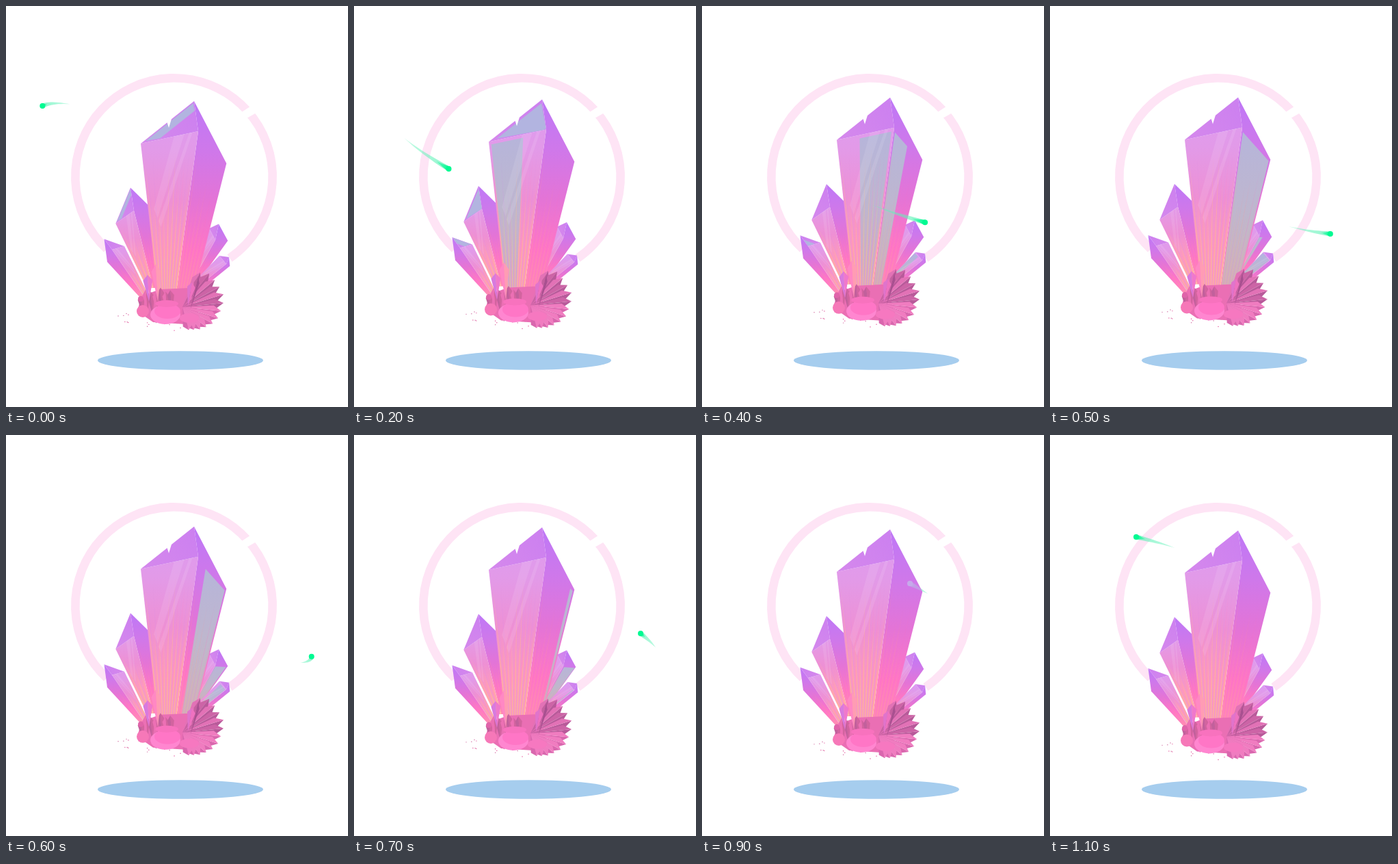
An HTML page with a canvas for the animation above (1.2 s loop, 500 px wide and 586 px high).

```html
<!DOCTYPE html>
<html>
<head>
<meta charset="utf-8">
<style>
html, body { margin: 0; width: 100%; height: 100%; overflow: hidden; background: #fff; }
canvas { display: block; }
</style>
</head>
<body>
<canvas id="stage" width="500" height="586"></canvas>
<script>
const ctx = document.getElementById('stage').getContext('2d');
const LOOP = 1200, STEPS = 12, TURN = Math.PI * 2;
const { sin, cos } = Math;

// Each crystal has a three-faced tip and stands on a foot of half-width w.
// lit: the step at which the spark lights each face.
const main = { tip: [275, 139], left: [197, 201], ridge: [281, 183], right: [322.3, 230],
  foot: [247, 432], w: 24, lit: { cap: 1.5, front: 3, side: 5.2 } };
const crystals = [
  { tip: [311, 318.5], left: [297, 325], ridge: [306, 342], right: [324.3, 343],
    foot: [268, 410], w: 8, lit: { side: 6.5 } },
  { tip: [326, 367], left: [312, 365], ridge: [322, 377], right: [327.3, 380],
    foot: [268, 420], w: 10, lit: { front: 5.2 } },
  { tip: [143.5, 340.5], left: [173, 351], ridge: [155, 356], right: [148, 374],
    foot: [203, 426], w: -7, lit: { cap: 3 } },
  { tip: [182, 265.5], left: [160.3, 318], ridge: [187, 299], right: [209, 292],
    foot: [215, 412], w: 9, lit: { cap: 1.5 } },
  main
];

const CAP = ['#cc80f0', '#d588ec'];
const FRONT = ['#dc9bf2', '#e29ae8', '#ee90d4', '#ff9cba', '#ffb0a8'];
const SIDE = ['#be78f7', '#cf78ea', '#e474d6', '#ff76c6', '#ff8eb6'];
const GLOW = ['#b2b4e0', '#bdb6d0', '#c8bcba'];

const clamp = v => Math.max(0, Math.min(1, v));
const mix = (a, b, f) => [a[0] + (b[0] - a[0]) * f, a[1] + (b[1] - a[1]) * f];
const polar = ([x, y], angle, r) => [x + r * cos(angle), y + r * sin(angle)];

function random(seed) {
  return () => (seed = seed * 16807 % 2147483647) / 2147483647;
}

function gradient(from, to, colors) {
  const g = ctx.createLinearGradient(...from, ...to);
  colors.forEach((c, i) => g.addColorStop(i / (colors.length - 1), c));
  return g;
}

const outline = points => new Path2D('M' + points.join(' ') + 'z');

function poly(points, fill) {
  ctx.fillStyle = fill;
  ctx.fill(outline(points));
}

function dot(x, y, rx, ry, fill) {
  ctx.fillStyle = fill;
  ctx.beginPath();
  ctx.ellipse(x, y, rx, ry, 0, 0, TURN);
  ctx.fill();
}

// Maps u (across) and v (down) to a point of a four-cornered face
const facet = (tl, bl, tr, br) => (u, v) => mix(mix(tl, tr, u), mix(bl, br, u), v);

// A band of light that sweeps across a face, filling it around the peak
function glow(at, step, peak, fill) {
  const a = clamp(.65 * (step - peak - .4)), b = clamp(1 + .65 * (step - peak + .4));
  if (!(b > a)) return;
  const u0 = .04 + .92 * a, u1 = .04 + .92 * b;
  poly([at(u0, .02), at(u1, .02), at(u1, .95), at(u0, .95)], fill);
}

// Thin wedges running down a face
function streaks(at, seed, colors) {
  const rnd = random(seed), n = Math.round(Math.abs(at(1, 0)[0] - at(0, 0)[0]) / 3.2);
  for (let i = 1; i < n; i++) {
    const [x, y] = at(i / n, 1);
    poly([at(i / n, .1 + rnd() * .4), [x + .9, y], [x - .9, y]], colors[i % colors.length]);
  }
}

function drawCrystal({ tip, left, ridge, right, foot, w, lit }, step) {
  const footL = [foot[0] - w, foot[1]], footR = [foot[0] + w, foot[1]];
  const fill = colors => gradient([0, tip[1]], [0, foot[1]], colors);
  const cap = facet(tip, left, ridge, ridge);
  const front = facet(left, footL, ridge, foot);
  const side = facet(ridge, foot, right, footR);

  poly([tip, right, footR, foot, ridge], fill(SIDE));
  poly([left, ridge, foot, footL], fill(FRONT));
  poly([tip, left, ridge], gradient(tip, left, CAP));
  glow(cap, step, lit.cap, GLOW[0]);
  glow(front, step, lit.front, fill(GLOW));
  glow(side, step, lit.side, fill(GLOW));

  streaks(front, 17, ['#ff80cc78', '#ffbc8c88', '#d88cf060']);
  streaks(side, 91, ['#ff70c455', '#ff949c60']);
  poly([front(.58, 0), front(.76, 0), front(.22, .48), front(.14, .42)], '#ffffff18');
  poly([front(.84, 0), front(.9, 0), front(.3, .54), front(.24, .5)], '#ffffff18');
}

// Two-tone splinter from a base point to a tip
function shard(base, tip, w, light, dark) {
  const angle = Math.atan2(tip[1] - base[1], tip[0] - base[0]), m = mix(base, tip, .8);
  poly([base, polar(m, angle + Math.PI / 2, w), tip], dark);
  poly([base, polar(m, angle - Math.PI / 2, w), tip], light);
}

function dust() {
  const rnd = random(29);
  for (let i = 0; i < 20; i++) {
    const f = rnd();
    dot(164 + 123 * f, 442 + 24 * Math.sqrt(f) + rnd() * 13, .7, .7, i % 2 ? '#e4529a' : '#d06aa0');
  }
}

function rocks() {
  const rnd = random(7), hub = [258, 440];
  poly([[192, 446], [198, 424], [225, 414], [268, 412], [284, 458], [262, 465], [215, 462]], '#ea6fb4');

  // Fan of splinters on the right, dark above and pink below
  for (let i = 0; i < 13; i++) {
    const angle = -1.1 + i * .2, r = 44 + 17 * cos((angle + .55) * 1.3) + rnd() * 4;
    const low = angle > .1;
    shard(hub, polar(hub, angle, r), 7,
      low ? '#f07cc0' : i % 2 ? '#cc64a6' : '#e272b6', low ? '#d967ae' : '#b85a9a');
  }
  shard([270, 442], [281, 395], 4, '#c4609f', '#a85090');

  // Row of small points on the left
  for (let i = 0; i < 7; i++) {
    const x = 197 + i * 7.2;
    shard([x + 3, 452], [x, 411 + rnd() * 9 + 10 * (i === 0)], 5,
      i % 2 ? '#ec70b4' : '#c2609c', '#d2649f');
  }
  shard([222, 432], [219, 377], 7, '#ff88c4', '#ff9cb4');
  shard([209, 432], [207, 393], 7, '#d87ade', '#f078cc');
  shard([266, 438], [272, 404], 6, '#e074cc', '#ef72c0');

  // Rounded stones
  dot(197, 428, 4, 4, '#e064aa');
  dot(200, 446, 9, 9, '#f678b8');
  dot(268, 456, 14, 7, '#f678c0');
  dot(233, 451, 22, 14, '#ff86d0');
  dot(236, 446, 19, 11, '#ff76c6');
  dot(235, 435, 17, 5, '#f872be');
}

function cluster(step) {
  dust();
  crystals.forEach(c => drawCrystal(c, step));
  poly([[235, 169], [236.5, 173], [238, 178], [242, 165]], '#fff');
  rocks();
}

function backdrop() {
  dot(255, 518, 121, 13.8, '#a6cdee');
  ctx.strokeStyle = '#fee4f5';
  ctx.lineWidth = 12.6;
  ctx.beginPath();
  ctx.arc(245.5, 249.5, 144.2, 2.32, TURN + .97);
  ctx.stroke();
  poly([[343, 156], [357, 147], [366, 156], [352, 164]], '#fff');
}

// Tilted orbit, bent by its second and third harmonics
function place(step) {
  const a = step / STEPS * TURN;
  return [
    259 - 184.7 * cos(a) - 36 * sin(a) - 9 * cos(2 * a) - 15.5 * sin(2 * a) - 12 * cos(3 * a),
    242.7 - 83.9 * cos(a) + 35.2 * sin(a) - 7.8 * cos(2 * a) - 2.5 * sin(2 * a) - 5 * cos(3 * a) + 1.7 * sin(3 * a)
  ];
}

// Tapered tail along the orbit behind the spark
function ribbon(step, length, colors) {
  const n = 12, edge = [], other = [];
  for (let i = 0; i <= n; i++) {
    const s = step - length * (1 - i / n), p = place(s), q = place(s - .02);
    const angle = Math.atan2(p[1] - q[1], p[0] - q[0]) + Math.PI / 2;
    edge.push(polar(p, angle, 3.6 * i / n));
    other.unshift(polar(p, angle, -3.6 * i / n));
  }
  poly([...edge, ...other], gradient(place(step - length), place(step), colors));
}

function spark(step, tail, head) {
  const length = .65 + .2 * sin(step / STEPS * TURN);
  ribbon(step, length, [tail + '60', tail + 'b0']);
  ribbon(step, length * .25, [head + '40', head]);
  dot(...place(step), 4, 4, head);
}

// The spark as it shows through the main crystal
function ghost(step) {
  const { tip, left, right, foot, w } = main;
  ctx.save();
  ctx.clip(outline([left, tip, right, [foot[0] + w, foot[1]], [foot[0] - w, foot[1]]]));
  spark(step, '#b8b4e4', '#c6aaea');
  ctx.restore();
}

function draw(time) {
  const step = Math.floor(time % LOOP / LOOP * STEPS);
  const behind = step > 7;
  ctx.clearRect(0, 0, 500, 586);
  backdrop();
  if (behind) spark(step, '#60f2b8', '#00fa92');
  ctx.save();
  ctx.translate(0, 3 * cos((step - 11) / STEPS * TURN) - 2.6);
  cluster(step);
  if (behind) {
    ctx.translate(0, 2.6 - 3 * cos((step - 11) / STEPS * TURN));
    ghost(step);
  }
  ctx.restore();
  if (!behind) spark(step, '#60f2b8', '#00fa92');
}

const start = performance.now();
function tick() {
  draw(performance.now() - start);
  requestAnimationFrame(tick);
}
tick();
</script>
</body>
</html>
```
